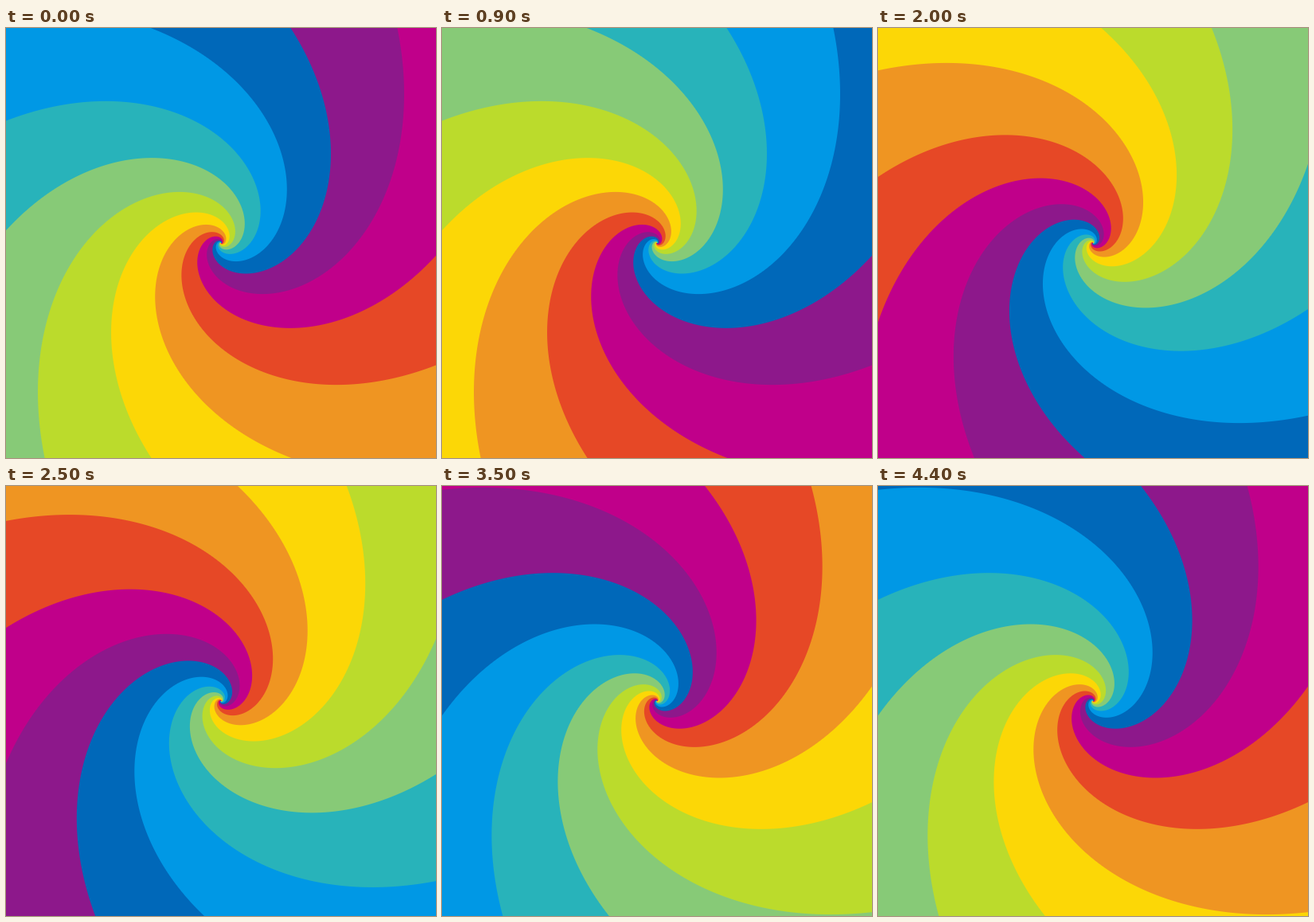
Write an HTML page with a canvas that moves like this. It is 540x540 px and loops after 4500 ms.

```html
<!DOCTYPE html>
<html lang="en">
<head>
<meta charset="utf-8">
<title>Rainbow spiral</title>
<style>
  html, body { margin: 0; width: 100%; height: 100%; overflow: hidden; background: #fcd706; }
  canvas { display: block; width: 540px; height: 540px; }
</style>
</head>
<body>
<canvas id="stage" width="540" height="540"></canvas>
<script>
const SIZE = 540, MID = SIZE / 2;
const LOOP = 4500, HOLD = 100;   // ms
const TICK = 30, TURN = 2.4;     // degrees turned per 30 ms tick
const ARM = 36;                  // degrees per arm
const GROWTH = 0.511;            // log of the radius ratio between neighbouring arms
const OFFSET = -13.052;          // arm number at angle 0, radius 1

const COLORS = [
  [252, 215, 6], [187, 219, 44], [135, 202, 119], [40, 179, 186], [0, 152, 229],
  [0, 104, 185], [141, 24, 139], [192, 0, 138], [230, 72, 38], [239, 149, 34]
];
const COUNT = COLORS.length;

const ctx = document.getElementById('stage').getContext('2d');
const image = ctx.createImageData(SIZE, SIZE);
const phase = new Float32Array(SIZE * SIZE);   // position across the arms
const width = new Float32Array(SIZE * SIZE);   // arm thickness in pixels
const slope = Math.hypot(1 / GROWTH, 180 / Math.PI / ARM);

for (let y = 0, i = 0; y < SIZE; y++) {
  for (let x = 0; x < SIZE; x++, i++) {
    const dx = x + 0.5 - MID, dy = y + 0.5 - MID;
    const r = Math.hypot(dx, dy);
    const angle = Math.atan2(dy, dx) * 180 / Math.PI;
    phase[i] = Math.log(r) / GROWTH + angle / ARM + OFFSET + 5 * COUNT;
    width[i] = r / slope;
  }
}

function draw(degrees) {
  const shift = degrees / ARM, out = image.data;
  for (let i = 0, p = 0; i < phase.length; i++, p += 4) {
    const u = phase[i] - shift, arm = Math.floor(u), part = u - arm;
    const near = part < 0.5 ? -1 : 1;
    const edge = (near < 0 ? part : 1 - part) * width[i];
    const mix = Math.max(0, 0.5 - edge);   // smooth the pixel on the border
    const a = COLORS[arm % COUNT], b = COLORS[(arm + near) % COUNT];
    for (let c = 0; c < 3; c++) out[p + c] = a[c] + (b[c] - a[c]) * mix;
    out[p + 3] = 255;
  }
  ctx.putImageData(image, 0, 0);
}

const start = performance.now();
let shown = -1;

function frame() {
  const step = Math.floor((performance.now() - start) % LOOP / HOLD);
  if (step !== shown) {
    shown = step;
    draw(TURN * Math.round(step * HOLD / TICK));
  }
  requestAnimationFrame(frame);
}
frame();
</script>
</body>
</html>
```
